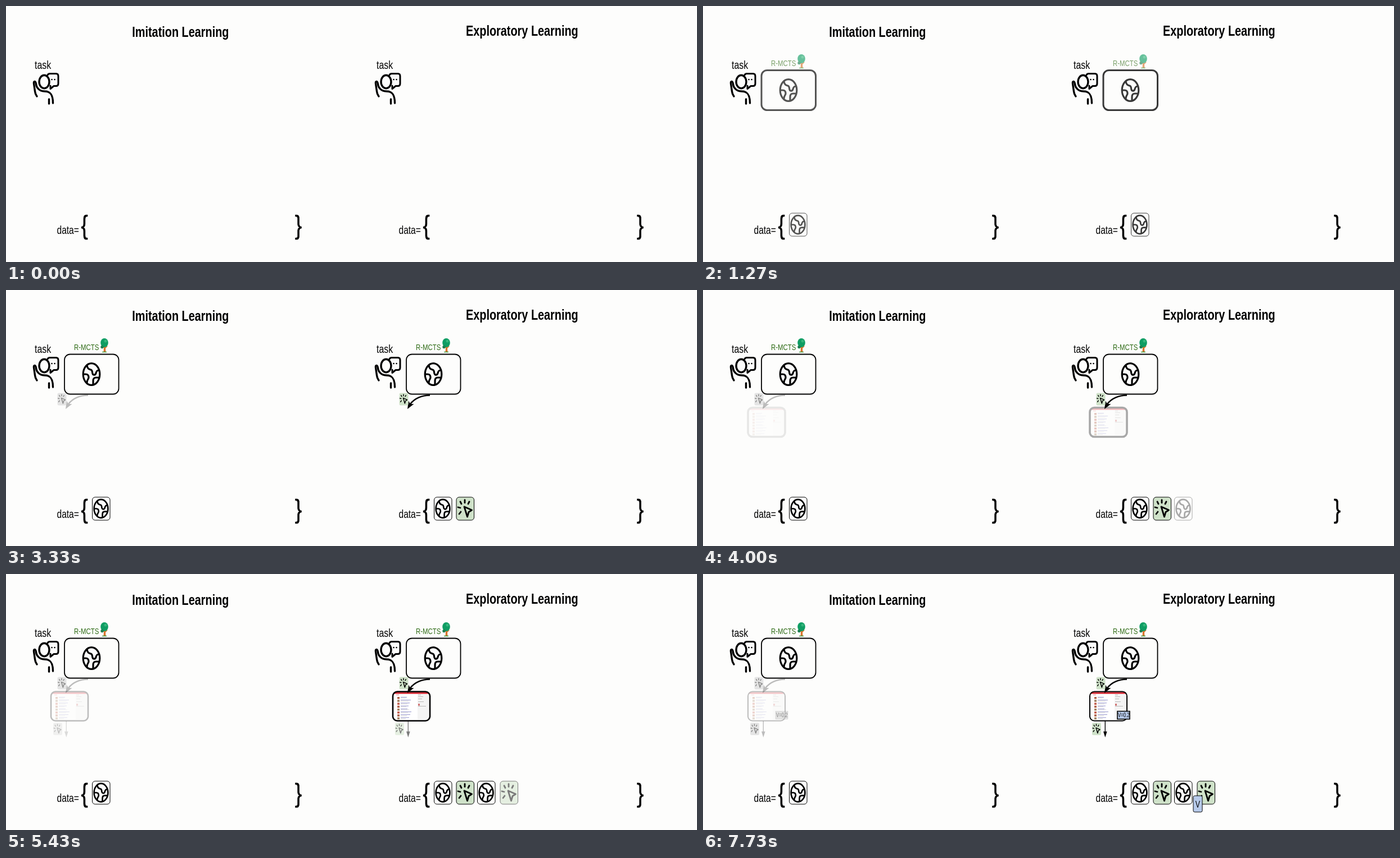
These frames come from a looping animation (1229 px wide and 456 px high, 8000 ms). An HTML page:

```html
<!DOCTYPE html>
<html lang="en">
<head>
<meta charset="utf-8">
<title>Imitation and Exploratory Learning</title>
<style>
  html, body { margin: 0; width: 100%; height: 100%; overflow: hidden; background: #fdfdfc; }
  svg { display: block; width: 1229px; height: 456px; font-family: "Liberation Sans", Arial, sans-serif; }
  .line { fill: none; stroke: #000; stroke-linecap: round; stroke-linejoin: round; }
</style>
</head>
<body>
<svg id="stage" viewBox="0 0 1229 456">
  <defs>
    <g id="globe" class="line" stroke-width="3.2">
      <ellipse rx="14.800" ry="19.400"/>
      <path d="M-8-16C-7-9-4-9-1-8S1-4 2-1 7 2 8-2 10-7 13-7M-14 0H-10C-6 0-5 3-5 6S-8 9-8 15M3 18V12C3 8 5 6 8 6H13"/>
    </g>
    <g id="click" class="line" stroke-width="2.8">
      <path d="M-2-4 11.5 2 6 5.5 3.5 14ZM-1-16V-11M-9-13l2 4M7-13l-2 4M-13-3l4 1M-11 9l3-4"/>
    </g>
    <g id="person" class="line" stroke-width="3.4">
      <path d="M74 123Q75 120.500 78 120.500H89Q93 120.500 93 125V138Q93 142.500 89 142.500H85L79 147.500V142" stroke-width="3"/>
      <ellipse cx="68" cy="135" rx="9" ry="11.800" fill="#fdfdfc"/>
      <path d="M55 161Q52 157 51.500 152L49.500 138Q49 134 51.500 134.500 53 135 53.500 139 54 144 57 147 61 152 69 152C79 152 83.500 158 83.500 173M76.500 166V174"/>
      <path d="M81.500 131h.1M86.500 131h.1" stroke-width="2.600"/>
    </g>
    <g id="tree">
      <path d="M173.500 110 174 103 170 101 171 100 174 101V97H176.500V102L180 99 180.500 100.500 177 104 177.500 110Z" fill="#d9742b"/>
      <ellipse cx="175" cy="94" rx="6.800" ry="8" fill="#0f9d63"/>
      <circle cx="177" cy="91" r="2.500" fill="#35b67c"/>
      <ellipse cx="171" cy="101.500" rx="2.700" ry="2.800" fill="#1c7f50"/>
      <path d="M171 110.500h8" stroke="#3f9a3f" stroke-width="1.400"/>
    </g>
    <g id="curve">
      <path d="M146 187.500Q123 188 111 203" fill="none" stroke="#000" stroke-width="2.500"/>
      <path d="M106 212 108 197.500 111 203 117.500 203Z"/>
    </g>
    <g id="down">
      <path d="M107.300 262V282" stroke="#000" stroke-width="1.400"/>
      <path d="M104 280.500H110.600L107.300 291Z"/>
    </g>
    <g id="page"></g>
  </defs>
  <g id="scene"></g>
</svg>
<script>
const $ = id => document.getElementById(id);

// Lettering shares the squeezed aspect ratio of the whole scene.
const text = (x, y, size, str, extra = '') =>
  `<text transform="translate(${x} ${y}) scale(.776 1)" font-size="${size}" ${extra}>${str}</text>`;
const rect = (x, y, w, h, r, extra) =>
  `<rect x="${x}" y="${y}" width="${w}" height="${h}" rx="${r}" ${extra}/>`;
const icon = (id, x, y, scale) =>
  `<use href="#${id}" transform="translate(${x} ${y}) scale(${scale})"/>`;
const fade = (start, body, peak = 1, length = 430) =>
  `<g data-start="${start}" data-peak="${peak}" data-length="${length}">${body}</g>`;

const GREEN = '#cfe2c9', BLUE = '#b7caea', OUTLINE = 'stroke="#000" stroke-width="1"';

const dataGlobe = x => rect(x, 369, 31.5, 41, 5, `fill="#fdfdfc" ${OUTLINE}`) + icon('globe', x + 15.5, 389.5, .84);
const dataClick = x => rect(x, 369, 31.5, 41, 5, `fill="${GREEN}" ${OUTLINE}`) + icon('click', x + 16, 390, 1);
const badge = (x, y, fill) => rect(x - 8, y - 11, 16, 22, 2.5, `fill="${fill}"`) + icon('click', x, y, .53);
const brace = (x, str) => text(x, 406, 47, str, 'stroke="#000" stroke-width=".7"');

function page() {
  let s = rect(80, 209.5, 66, 52, 8, 'fill="#fff"') +
    rect(82, 210.5, 62, 3, 0, 'fill="#d8232f"') + rect(124, 214, 20, 45, 0, 'fill="#f4f4f4"') +
    rect(86, 215, 5, 1, 0, 'fill="#e58a90"');
  for (let i = 0; i < 8; i++) {
    const y = 219 + i * 5.2;
    s += rect(88, y, 4, 3.5, 0, `fill="${['#b0604a', '#a08060', '#c25d4d'][i % 3]}"`) +
      rect(94, y, 11 + i * 7 % 9, .8, 0, 'fill="#7c7cc0"') +
      rect(94, y + 1.8, 9 + i * 5 % 7, .6, 0, 'fill="#bbb"');
  }
  for (const [y, w] of [[215, 5], [218, 9], [222, 7], [227, 10], [235, 14]])
    s += rect(125, y, w, .8, 0, 'fill="#aaa"');
  return s + rect(125, 231, 3, 3.5, 0, 'fill="#d07070"') +
    rect(80, 209.5, 66, 52, 8, 'class="line border"');
}

function panel(dx, explores) {
  const dim = explores ? 1 : .25, badgeDim = explores ? 1 : .45;
  const fill = explores ? GREEN : '#c8c8c8';
  const value = rect(129, 244.5, 22, 14, 0,
      `fill="${explores ? BLUE : '#c8c8c8'}" stroke="#000" stroke-width="${explores ? 1.6 : .2}"`) +
    text(130, 255.3, 10, 'V=0.2');
  const shown = explores ? 370 : 430;
  return `<g transform="translate(${dx} 0)">` +
    text(51, 112, 20.5, 'task') + '<use href="#person"/>' +
    text(90.5, 406, 20, 'data=') + brace(133.5, '{') + brace(514, '}') +
    fade(1000, text(121, 106.5, 14.7, 'R-MCTS', 'fill="#2d6a14"') + '<use href="#tree"/>') +
    fade(982, rect(104, 114.5, 96.5, 71, 10, 'class="line frame"') +
      icon('globe', 152, 150, 1) + dataGlobe(153.5), 1, shown) +
    fade(3860, '<use href="#page"/>', dim) +
    fade(2395, '<use href="#curve"/>', dim) +
    fade(2395, badge(99.5, 194.5, fill), badgeDim) +
    fade(5210, '<use href="#down"/>', dim) +
    fade(5210, badge(92, 276, fill), badgeDim) +
    fade(6595, value, badgeDim) +
    (explores
      ? fade(2395, dataClick(193)) + fade(3860, dataGlobe(230.5)) + fade(5210, dataClick(271)) +
        fade(6595, rect(264, 395, 16, 29, 2.5, `fill="${BLUE}" ${OUTLINE}`) + text(267.8, 416, 16, 'V'))
      : '') +
    '</g>';
}

$('page').innerHTML = page();
$('scene').innerHTML =
  text(224.3, 54.5, 25.6, 'Imitation Learning', 'font-weight="bold"') +
  text(818, 53, 25.6, 'Exploratory Learning', 'font-weight="bold"') +
  panel(0, false) + panel(608, true);

const fades = [...document.querySelectorAll('[data-start]')];
const frames = [...document.querySelectorAll('.frame')];
const border = document.querySelector('.border');

function draw() {
  const t = performance.now() % 8000;
  for (const el of fades) {
    const { start, peak, length } = el.dataset;
    el.setAttribute('opacity', peak * Math.min(1, Math.max(0, (t - start) / length)));
  }
  for (const el of frames) el.setAttribute('stroke-width', t < 2600 ? 3 : 1.8);
  border.setAttribute('stroke-width', t < 5200 ? 3.6 : t < 6600 ? 2.6 : 2);
  requestAnimationFrame(draw);
}
draw();
</script>
</body>
</html>
```
